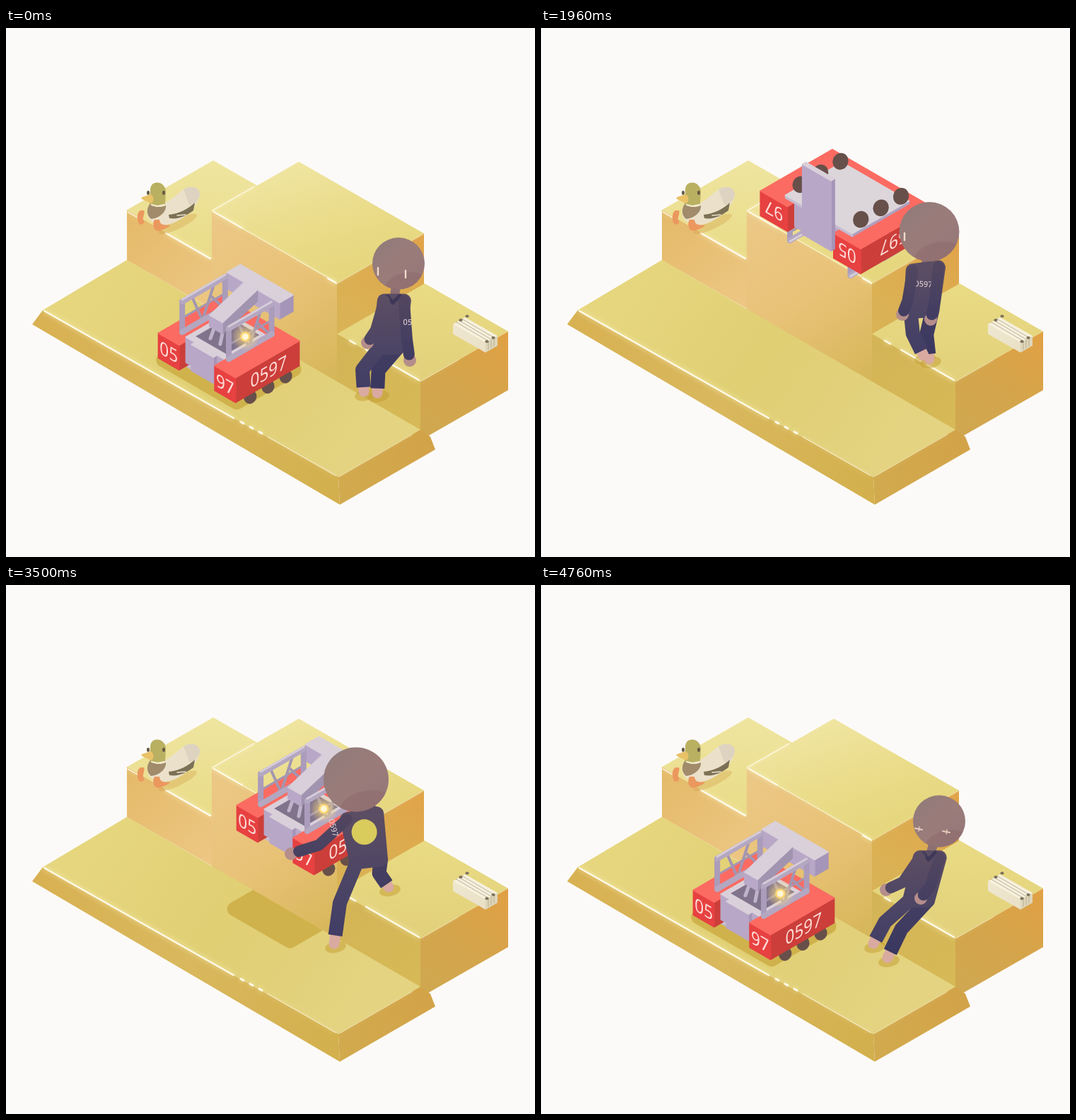
Write an HTML page with a canvas that moves like this. It is 748x748 px and loops after 4.9 s.

```html
<!DOCTYPE html>
<html lang="en">
<head>
<meta charset="utf-8">
<title>Robot on the steps</title>
<style>
html, body { margin: 0; width: 100%; height: 100%; overflow: hidden; background: #fcfaf8; }
canvas { display: block; width: 748px; height: 748px; }
</style>
</head>
<body>
<canvas id="stage" width="748" height="748"></canvas>
<script>
const STEP = 140, COUNT = 35;
const LEFT_NO = '05', RIGHT_NO = '97', FULL_NO = LEFT_NO + RIGHT_NO;
const FONT = '"Noto Sans", "Open Sans", sans-serif';
const screen = document.getElementById('stage').getContext('2d');
const backdrop = document.createElement('canvas');
backdrop.width = backdrop.height = 748;
let c = backdrop.getContext('2d');

// ---------- helpers ----------
const lerp = (a, b, t) => a + (b - a) * t;
const mix = (a, b, t) => a.map((v, i) => lerp(v, b[i], t));
const span = (k, from, to) => Math.max(0, Math.min(1, (k - from) / (to - from)));
const smooth = t => t * t * (3 - 2 * t);
const arch = t => Math.sin(Math.PI * t);

function trace(pts) {
  c.beginPath();
  for (let i = 0; i < pts.length; i += 2) c.lineTo(pts[i], pts[i + 1]);
}

function poly(pts, fill, grow = 0) {
  trace(pts);
  c.closePath();
  c.fillStyle = fill;
  c.fill();
  if (grow) {
    c.strokeStyle = fill;
    c.lineWidth = grow;
    c.lineJoin = 'round';
    c.stroke();
  }
}

function line(pts, color, width, cap = 'round') {
  trace(pts);
  c.strokeStyle = color;
  c.lineWidth = width;
  c.lineCap = cap;
  c.lineJoin = 'round';
  c.stroke();
}

function oval(x, y, rx, ry, fill, turn = 0) {
  c.beginPath();
  c.ellipse(x, y, rx, ry, turn, 0, 7);
  c.fillStyle = fill;
  c.fill();
}

function shape(d, fill) {
  c.fillStyle = fill;
  c.fill(new Path2D(d));
}

function grad(x0, y0, x1, y1, ...colors) {
  const g = c.createLinearGradient(x0, y0, x1, y1);
  colors.forEach((v, i) => g.addColorStop(i / (colors.length - 1), v));
  return g;
}

// ---------- still scene ----------
const SLOPE = .573;
const FLOOR = [52, 399, 171, 328, 586, 568, 470, 635];

// x, y: front corner of the top face; left and right: widths of the two sides
function block(x, y, left, right, h, tops, lefts, rights) {
  const l = [x - left, y - left * SLOPE], r = [x + right, y - right * SLOPE];
  const back = [l[0] + right, l[1] - right * SLOPE];
  poly([...l, x, y, x, y + h, l[0], l[1] + h], grad(l[0], l[1], x, y + h, ...lefts));
  poly([x, y, ...r, r[0], r[1] + h, x, y + h], grad(x, y + h, ...r, ...rights));
  poly([...l, ...back, ...r, x, y], grad(...back, x, y, ...tops));
}

function shine(x, y, dx, width, alpha = 1, slope = SLOPE) {
  c.save();
  c.globalAlpha = alpha;
  c.shadowColor = '#fff3c4';
  c.shadowBlur = 7;
  line([x, y, x + dx, y + dx * slope], '#fffbea', width);
  c.restore();
}

function drawSteps() {
  c.fillStyle = '#fcfaf8';
  c.fillRect(0, 0, 748, 748);
  block(291, 326, 120, 122, 71, ['#efe5a0', '#e9db87'], ['#e4b968', '#edc784'], ['#dfb060', '#dfb060']);
  block(468, 361, 177, 123, 141, ['#f0e5a1', '#eadc8a', '#e5d67c'], ['#ecc887', '#e8c277', '#d5b658'], ['#d6b658', '#dbb053', '#e1a247']);
  block(586, 500, 118, 124, 83, ['#e9db84', '#e2d07a'], ['#d3b456', '#d7ba57'], ['#cfa851', '#d4a54b', '#e2a044']);
  poly([52, 399, 470, 635, 472, 674, 37, 419], grad(45, 410, 470, 650, '#d8b152', '#d9b85e', '#d3b04d'));
  poly([470, 635, 586, 568, 600, 578, 607, 596, 472, 674], grad(470, 650, 600, 585, '#d2aa4e', '#d3a348'));
  poly(FLOOR, grad(120, 350, 500, 610, '#e6d67e', '#e0cf73', '#e4d381'));

  shine(54, 400, 268, 2.2, 1, .566);
  for (let i = 0; i < 3; i++) shine(332 + i * 13, 557 + i * 7, 4, 3);
  shine(370, 578, 96, 1.2, .6);
  shine(226, 290, 63, 2.4);
  shine(172, 260, 14, 1.5, .8);
  shine(292, 258, 59, 1.6, .8, -SLOPE);
  shine(292, 259, 174, 1.2, .7);
  shine(294, 260, 40, 2);
  shine(455, 354, 12, 2.2);
  shine(469, 361, 121, 1, .4, -SLOPE);
  shine(486, 442, 8, 2.4);
  shine(509, 455, 75, 2.2);
  shine(588, 499, 52, 1, .4, -SLOPE);
  shine(472, 634, 103, 1, .35, -SLOPE);
}

function drawDuck() {
  oval(243, 277, 30, 7, 'rgba(205,150,60,.3)', -.45);
  shape('M203 249C221 256 236 240 251 228C260 222 273 224 274 234C275 248 251 276 223 279C204 278 194 266 203 249Z', '#ebe1cb');
  shape('M251 228C260 222 273 224 274 234C274 243 266 250 259 250Z', '#ddd3c0');
  shape('M203 249C211 254 219 254 226 251C227 260 217 269 205 270C198 264 199 255 203 249Z', '#a18b6b');
  shape('M230 264C245 263 258 255 267 247L265 258C254 266 244 271 231 269Z', '#7c7055');
  line([242, 265, 254, 264], '#ebe1cb', 1.5);
  shape('M203 249L204 230C203 214 225 215 226 231L225 249C218 254 209 253 203 249Z', '#bab062');
  line([206, 250, 214, 252, 224, 250], '#f5efce', 2);
  shape('M204 235C198 238 192 238 191 241C198 245 203 247 206 248C210 244 209 237 204 235Z', '#e9c268');
  for (const x of [201, 223]) oval(x, 233, 2, 3, '#665a45');
  shape('M190 258C184 261 185 276 190 278C195 278 197 274 194 271C193 268 197 261 195 258Z', '#eb985e');
  shape('M210 271C206 277 209 288 216 287C221 285 229 283 232 279C225 278 218 280 217 271Z', '#eb985e');
}

function drawCase() {
  poly([634, 425, 671, 456, 678, 445], 'rgba(190,125,45,.4)');
  block(678, 445, 46, 17, 14, ['#f6f0de', '#f6f0de'], ['#efe7d0', '#e9e0c6'], ['#ded6bb', '#ded6bb']);
  for (let i = 1; i < 4; i++) {
    const x = 632 + i * 4, y = 418 - i * 2.4;
    line([x, y, x + 46, y + 27, x + 46, y + 39], '#b7aa8c', .9);
  }
  for (const x of [0, 37]) for (const s of [0, 9]) oval(643 + x + s, 413 + x * .82 - s * .6, 2.6, 2, '#7d725c');
}

// ---------- robot: boxes in isometric space (u right-down, v right-up, w up) ----------
const RED = [[251, 107, 98], [231, 65, 65], [204, 62, 58]];
const GREY = [[217, 208, 218], [185, 167, 199], [165, 149, 184]];
const PALE = [[220, 214, 219], [198, 188, 208], [175, 160, 190]];

function robot(x, y, roll, fold) {
  const cr = Math.cos(roll), sr = Math.sin(roll);
  const turn = ([u, v, w]) => [u * cr - w * sr, v, u * sr + w * cr];
  const iso = ([u, v, w]) => [.866 * (u + v), .5 * (u - v) - w];
  const near = ([u, v, w]) => u - v + w;
  // parts above the body sink in while the robot lies on its back
  const place = ([u, v, w]) => turn([u * (1 + .3 * fold), v * (1 + .13 * fold), w > 38 ? lerp(w, 38, .5 * fold) : w]);
  const flat = p => {
    const [dx, dy] = iso(place(p));
    return [x + dx, y + dy];
  };
  const path = (...pts) => pts.flatMap(flat);
  const faces = n => near(turn(n)) > .01;
  const shade = (n, tones) => {
    const [u, v, w] = turn(n);
    const m = [w * w, v * v, u * u];
    return 'rgb(' + [0, 1, 2].map(i => Math.round(tones.reduce((s, t, j) => s + t[i] * m[j], 0))) + ')';
  };
  const items = [];
  const add = (p, draw, bias = 0) => items.push({ d: near(place(p)) + bias, draw });

  function sides(lo, hi, tones) {
    for (let ax = 0; ax < 3; ax++) for (const s of [-1, 1]) {
      const n = [0, 0, 0];
      n[ax] = s;
      if (!faces(n)) continue;
      const p = (ax + 1) % 3, q = (ax + 2) % 3;
      const corners = [[0, 0], [1, 0], [1, 1], [0, 1]].map(([i, j]) => {
        const v = [];
        v[ax] = s > 0 ? hi[ax] : lo[ax];
        v[p] = i ? hi[p] : lo[p];
        v[q] = j ? hi[q] : lo[q];
        return v;
      });
      poly(path(...corners), shade(n, tones), 1.5);
    }
  }
  const box = (lo, hi, tones, bias, after) =>
    add(mix(lo, hi, .5), () => { sides(lo, hi, tones); if (after) after(); }, bias);

  function label(text, p, right, n) {
    if (!faces(n)) return;
    c.save();
    c.transform(...iso(turn(right)), ...iso(turn([0, 0, -1])), ...flat(p));
    c.font = '26px ' + FONT;
    c.textAlign = 'center';
    c.textBaseline = 'alphabetic';
    c.fillStyle = '#ffdcd7';
    c.fillText(text, 0, 9.5);
    c.restore();
  }

  function bumper(side) {
    const lo = side < 0 ? -63 : 29;
    box([lo, -52, 0], [lo + 34, 52, 35], RED, 0, () => {
      label(side < 0 ? LEFT_NO : RIGHT_NO, [lo + 17, -52, 17], [1, 0, 0], [0, -1, 0]);
      label(FULL_NO, [63 * side, 2, 17], [0, side, 0], [side, 0, 0]);
    });
  }

  function truss(u) {
    add([u, -3, 64], () => {
      const bar = (v0, w0, v1, w1, width, color) => line(path([u, v0, w0], [u, v1, w1]), color, width);
      for (const v of [-22, 14]) bar(-5, 42, v, 84, 4, '#a396b1');
      bar(30, 42, 10, 68, 4, '#a396b1');
      bar(-38, 62, 30, 62, 3, '#a396b1');
      for (const v of [-38, 32]) bar(v, 42, v, 85, 8, '#aa9cba');
      for (const w of [42, 85]) bar(-38, w, 32, w, 8, '#b4a7c1');
      bar(-38, 88, 32, 88, 3, '#d5ccd9');
    });
  }

  const under = -cr;
  for (const s of [-1, 1]) {
    bumper(s);
    truss(38 * s);
  }
  box([-29, 30, 0], [29, 52, 35], RED);
  box([-32, -38, 2], [32, 30, 38], GREY, 0, () => {
    if (!faces([0, 0, 1])) return;
    poly(path([-25, -29, 38], [25, -29, 38], [25, 25, 38], [-25, 25, 38]), '#81738c');
    for (const u of [-8, 8]) line(path([u, -22, 40], [u * .7, -12, 66]), '#bfb3ca', 5);
  });
  box([-42, -40, -1], [42, 42, 3], PALE, 80 * under);
  box([-18, -43, -62 * fold], [18, -38, 37], GREY, 200 * fold);
  const back = 40 - 35 * fold;
  box([-43, back, 62], [43, back + 22, 85], GREY);

  add([-1, 8, 75], () => {
    const end = (u, w) => [u, -20, w], top = (u, w) => [u, 37, w + 18];
    poly(path(end(10, 54), top(10, 54), top(10, 70), end(10, 70)), '#a194b0', 1);
    poly(path(end(-12, 54), end(10, 54), end(10, 70), end(-12, 70)), '#b9a8c7', 1);
    poly(path(end(-12, 70), end(10, 70), top(10, 70), top(-12, 70)), '#d8cfda', 1);
  });

  for (const s of [-1, 1]) for (let i = -1; i < 2; i++) {
    const p = [s * (58 - 20 * fold), 6 + i * 29, -9];
    add(p, () => oval(...flat(p), 9 + 2 * fold, 10 + 2 * fold, '#67504a', .4), 160 * under);
  }

  if (cr > .4 && fold < .5) add([38, -11, 60], () => {
    const [gx, gy] = flat([38, -11, 60]);
    const g = c.createRadialGradient(gx, gy, 1, gx, gy, 20);
    g.addColorStop(0, 'rgba(255,240,170,.9)');
    g.addColorStop(.4, 'rgba(255,222,125,.5)');
    g.addColorStop(1, 'rgba(255,220,120,0)');
    oval(gx, gy, 20, 20, g);
    oval(gx, gy, 7, 7, '#ffd673');
    oval(gx, gy, 4.5, 4.5, '#fff7d6');
  }, 30);

  items.sort((a, b) => a.d - b.d).forEach(i => i.draw());
}

function floorShadow(x, y, size, alpha) {
  c.save();
  trace(FLOOR);
  c.clip();
  c.globalAlpha = alpha;
  const pts = [[-1, -1], [1, -1], [1, 1], [-1, 1]].flatMap(([a, b]) =>
    [x + .866 * size * (60 * a + 47 * b), y + .5 * size * (60 * a - 47 * b)]);
  poly(pts, '#d0b24c', 20);
  c.restore();
}

// run-up and leap, then lifted, rolled over, lowered and set down
function drawRobot(k) {
  if (k < 17) {
    const leap = smooth(span(k, 2, 8)), run = arch(span(k, 0, 4));
    floorShadow(lerp(315, 432, leap) - 9 * run, 476 - 5 * run, 1, 1 - leap);
    robot(lerp(315, 432, leap) - 9 * run, lerp(472, 242, leap) - 5 * run, Math.PI * leap, leap);
    return;
  }
  const lift = span(k, 17, 24), lower = span(k, 24, 25), set = smooth(span(k, 25, 30));
  const x = lerp(lerp(432, 426, lift), 315, set);
  const y = lerp(242, 276, lift) - 50 * Math.sqrt(Math.max(0, arch(lift))) + 76 * lower + 120 * set;
  floorShadow(lerp(393, 315, set), lerp(463, 476, set), lerp(.76, 1, set), (span(k, 21, 24) + lower) / 2);
  robot(x, y, Math.PI * (1 + lift), 1 - lift);
}

// ---------- person ----------
// hands and feet: left then right; back: 0 facing us, 1 facing away; knee: how far the knees bend
const POSES = {
  sit: { head: [555, 333], hip: [541, 452], hands: [511, 445, 571, 470], feet: [506, 514, 525, 516], back: 0, knee: 13 },
  stand: { head: [549, 288], hip: [538, 400], hands: [511, 405, 551, 412], feet: [541, 463, 549, 468], back: .6, knee: 6 },
  reach: { head: [511, 246], hip: [526, 375], hands: [431, 297, 515, 250], feet: [507, 430, 535, 427], back: 1, knee: 0 },
  carry: { head: [495, 275], hip: [513, 390], hands: [403, 380, 495, 280], feet: [464, 507, 541, 427], back: 1, knee: 8 },
  place: { head: [390, 388], hip: [412, 484], hands: [299, 475, 390, 395], feet: [411, 544, 456, 521], back: 1, knee: 14 },
  fall: { head: [563, 334], hip: [534, 446], hands: [488, 431, 537, 443], feet: [470, 507, 490, 527], back: 0, knee: 9 }
};
const ACTS = [[0, 'sit'], [8, 'sit'], [14, 'stand'], [18, 'reach'], [24, 'reach'], [25, 'carry'], [30, 'place'], [32, 'place'], [34, 'fall'], [35, 'sit']];

function poseAt(k) {
  const i = ACTS.findIndex(a => a[0] > k) - 1;
  const [k0, a] = ACTS[i], [k1, b] = ACTS[i + 1];
  const t = span(k, k0, k1), p = {};
  for (const key in POSES[a]) {
    const from = POSES[a][key], to = POSES[b][key];
    p[key] = from.map ? mix(from, to, t) : lerp(from, to, t);
  }
  // slide off the step before climbing it; hop back at the end
  const dy = 48 * arch(span(k, 8, 14)) - 25 * arch(span(k, 32, 34));
  const dx = -20 * arch(span(k, 8, 14));
  for (const key of ['head', 'hip', 'hands', 'feet']) p[key] = p[key].map((v, j) => v + (j % 2 ? dy : dx));
  return p;
}

function smallNo(text, x, y, turn) {
  c.save();
  c.translate(x, y);
  c.rotate(turn);
  c.font = '11px ' + FONT;
  c.textAlign = 'center';
  c.textBaseline = 'middle';
  c.fillStyle = '#f0dfdc';
  c.fillText(text, 0, 0);
  c.restore();
}

function drawPerson(k) {
  const { head, hip, hands, feet, back, knee } = poseAt(k);
  const [hx, hy] = head, r = 37 + 9 * back;
  const front = back < .35, away = back > .75;
  const len = Math.hypot(hip[0] - hx, hip[1] - hy);
  const chest = mix(head, hip, 53 / len);
  const wide = 14 + 7 * back, tilt = 4 * back;
  const shoulder = s => [chest[0] + s * wide, chest[1] - s * tilt];
  const thigh = s => [hip[0] + s * (13 + 4 * back), hip[1] - s * tilt / 2];
  const low = Math.max(feet[1], feet[3]);
  const suit = grad(hx, chest[1], hx, low, '#5b4d63', '#4c4565', '#3f3c65');
  const dark = grad(hx, chest[1], hx, low, '#514660', '#423d61', '#393760');

  const limb = (pts, s) => pts.slice(s + 1, s + 3);
  const leg = (s, fill) => {
    const a = thigh(s), foot = limb(feet, s);
    const [mx, my] = mix(a, foot, .5), bend = [mx - knee, my];
    const ankle = mix(bend, foot, .8);
    line([...ankle, ...foot], '#d9aaa0', 15);
    oval(...a, 10, 10, fill);
    line([...a, ...bend, ...ankle], fill, 20, 'butt');
  };
  const arm = (s, fill) => {
    const a = shoulder(s), hand = limb(hands, s);
    const [mx, my] = mix(a, hand, .5), elbow = [mx, my + 12];
    oval(...hand, 9, 9, '#b58e8b');
    line([...a, ...elbow, ...mix(elbow, hand, .72)], fill, 16);
  };

  for (const s of [-1, 1]) {
    const [fx, fy] = limb(feet, s);
    oval(fx + 2, fy + 5, 15, 8, 'rgba(196,158,48,.5)', -.2);
  }
  leg(1, dark);
  leg(-1, suit);
  if (away) arm(1, dark);
  line([hx, hy, ...chest], '#8d7074', 13);
  poly([...shoulder(-1), ...shoulder(1), ...thigh(1), ...thigh(-1)], suit, 20);

  if (away) {
    oval(...mix(chest, hip, .35), 18, 18, '#d9cb5c');
  } else if (front) {
    line([chest[0] - 9, chest[1] - 6, chest[0] - 2, chest[1] + 3, chest[0] + 8, chest[1] - 7], '#3e3858', 5);
  } else {
    oval(chest[0] + 16, chest[1] + 22, 5, 16, '#d9cb5c');
    smallNo(FULL_NO, chest[0] - 3, chest[1] + 22, .05);
  }

  if (!away) arm(1, dark);
  arm(-1, front ? suit : dark);
  if (away) smallNo(FULL_NO, ...mix(shoulder(-1), limb(hands, -1), .25), 1.3);
  if (k < 9) smallNo(LEFT_NO, chest[0] + 19, chest[1] + 31, .05);

  oval(hx, hy, r, r * .99, grad(hx - r, hy - r, hx + r, hy + r, '#8f7b7a', '#9a7c7a', '#95767a'));
  c.save();
  c.beginPath();
  c.arc(hx, hy, r, 0, 7);
  c.clip();
  oval(hx + r * .3, hy + r * .8, r * .8, r * .45, 'rgba(139,101,103,.4)', -.2);
  c.restore();

  if (away) return;
  const eyes = front ? [[-29, 11], [10, 15]] : [[-35, 7]];
  for (const [dx, dy] of eyes) {
    const x = hx + dx, y = hy + dy;
    if (k < 30) line([x, y - 5, x, y + 5], '#f0dcca', 2.4);
    else {
      line([x - 5, y - 1, x + 5, y + 1], '#e6cdbd', 2);
      line([x + 1, y - 3, x, y + 3], '#e6cdbd', 1.4);
    }
  }
}

// ---------- playback ----------
drawSteps();
drawDuck();
drawCase();
c = screen;

function draw(now) {
  const k = Math.floor(now / STEP) % COUNT;
  c.drawImage(backdrop, 0, 0);
  drawRobot(k);
  if (k === 30) for (const y of [452, 464]) line([197, y, 205, y + 6], '#ec6a61', 4);
  drawPerson(k);
}

const start = performance.now();
function loop() {
  draw(performance.now() - start);
  requestAnimationFrame(loop);
}
loop();
</script>
</body>
</html>
```
